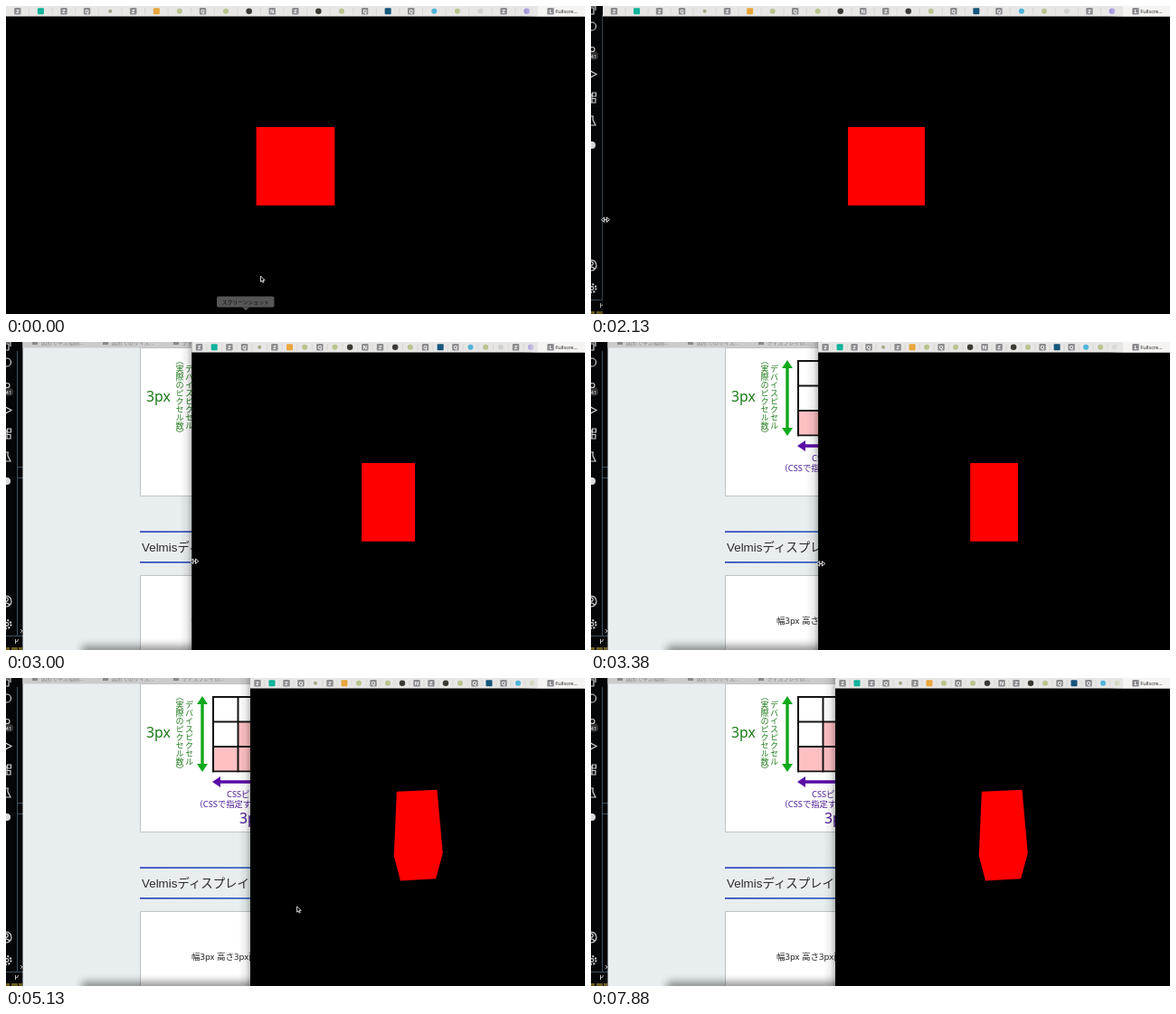
Animation, 640 px wide and 341 px high, one loop 8 s. Source, as an HTML page:

```html
<!DOCTYPE html>
<html lang="ja">
<head>
<meta charset="utf-8">
<title>Resize and orbit</title>
<style>
html, body { margin: 0; width: 100%; height: 100%; overflow: hidden; background: #000; }
svg { display: block; width: 100vw; height: 100vh; }
text { font-family: "Noto Sans", "Noto Sans CJK JP", "Noto Sans CJK", sans-serif; }
.mid { text-anchor: middle; }
.vert { writing-mode: vertical-rl; text-anchor: middle; font-size: 9.1px; }
.head { font: 13.4px "Liberation Sans", "Noto Sans CJK JP", "Noto Sans CJK", sans-serif; }
.icons { fill: none; stroke: #d4d4d4; stroke-width: 1.2; }
.dock { filter: blur(4px); opacity: .4; }
</style>
</head>
<body>
<svg viewBox="0 0 640 341">
  <defs>
    <linearGradient id="shade"><stop offset="0" stop-opacity="0"/><stop offset=".6" stop-opacity=".07"/><stop offset="1" stop-opacity=".24"/></linearGradient>
    <linearGradient id="fade"><stop offset="0" stop-color="#e7e6e5" stop-opacity="0"/><stop offset="1" stop-color="#e7e6e5"/></linearGradient>
    <linearGradient id="rule"><stop offset="0" stop-color="#3a50bd"/><stop offset="1" stop-color="#55b4d6"/></linearGradient>
    <pattern id="grid" x="228" y="20" width="27.500" height="27.500" patternUnits="userSpaceOnUse">
      <path d="M0 1H27.500M1 0V27.500" stroke="#111" stroke-width="2"/>
    </pattern>
  </defs>

  <!-- editor strip -->
  <rect width="640" height="341" fill="#050608"/>
  <path d="M12.500 10V326M12 138.500h7M12 150.500h7M0 325.500h19" stroke="#3b5360" fill="none"/>
  <g class="icons">
    <path d="M-4 2h7v7h-7M0 0h5v5"/>
    <circle cx="1" cy="22.500" r="4.500"/>
    <circle cx="1.500" cy="48" r="2.500"/>
    <path d="M-4 70L6 75.500L-4 81"/>
    <path d="M-4 98h5v9h-5M1 102.500h4v4.500h-4M1.500 96h4v4h-4z"/>
    <path d="M-2 122h5M2 122v4l3 6h-9"/>
    <circle cx="0" cy="287" r="6"/><circle cx="0" cy="285" r="2.200"/><path d="M-4 291q4-4 8 0"/>
    <circle cx="1" cy="312.500" r="4.500" stroke-width="2" stroke-dasharray="2 1.500"/><circle cx="1" cy="312.500" r="1.800"/>
    <path d="M16 318l2 2l-2 2M10.500 329v5M10.500 332q3 0 3-3" stroke-width=".9"/>
  </g>
  <circle cx="1" cy="154" r="4" fill="#ddd"/>
  <rect x="-3" y="51" width="11" height="8.500" rx="4" fill="#333"/>
  <text x="3" y="57.600" class="mid" font-size="6" fill="#fff">41</text>
  <path d="M0 339.500h19" stroke="#6c5d1c" stroke-width="3" stroke-dasharray="4 2 7 1"/>

  <!-- article window -->
  <rect x="18.500" width="622" height="341" fill="#e8eeef"/>
  <rect x="18.500" width="622" height="6.500" fill="#cbcbcb"/>
  <g id="pages" font-size="6" fill="#8a8a8a"></g>
  <path d="M640 6.500H148.500V170.500H640M640 258.500H148.500V345H640" fill="#fff" stroke="#bfc3c4"/>
  <g fill="#1d7a1a">
    <text x="155" y="66" font-size="15.800">3px</text>
    <text class="vert" x="202" y="61">デバイスピクセル</text>
    <text class="vert" x="191.500" y="61">（実際のピクセル数）</text>
  </g>
  <path d="M217 20l6 9h-4.300v66h4.300l-6 9l-6-9h4.300v-66h-4.300z" fill="#10a81c"/>
  <path d="M228 115l9-6v4.300h60v3.400h-60v4.300z" fill="#5a0da6"/>
  <path d="M256 48h56v55h-84v-27.500h28z" fill="#ffc0c4"/>
  <rect x="228" y="20" width="84.500" height="84.500" fill="url(#grid)"/>
  <g fill="#4c1a96">
    <text x="244" y="131.500" font-size="9.300">CSSピクセル</text>
    <text x="208.500" y="142.500" font-size="9.300">（CSSで指定するピクセル）</text>
    <text x="258" y="161" font-size="15.800">3px</text>
  </g>
  <rect x="148" y="209.200" width="492" height="1.800" fill="url(#rule)"/>
  <rect x="148" y="243" width="492" height="1.800" fill="url(#rule)"/>
  <text class="head" x="150" y="232" fill="#2b2b2b">Velmisディスプレイ</text>
  <text x="205" y="311.500" font-size="9.500" fill="#222">幅3px 高さ3px画像</text>
  <rect class="dock" x="84" y="336" width="560" height="20"/>

  <!-- front window -->
  <rect id="shadow" width="13" height="341" fill="url(#shade)"/>
  <rect id="stage" width="640" height="341"/>
  <path id="cube" fill="#f00"/>
  <rect id="bar" width="640" height="11.500" fill="#e7e6e5"/>
  <g id="tabs"></g>
  <rect x="572" width="16" height="11.500" fill="url(#fade)"/>
  <rect x="588" width="52" height="11.500" fill="#f5f4f3"/>
  <g id="active"></g>
  <text x="607.300" y="7.900" font-size="5.600" fill="#222">Fullscre…</text>

  <g id="tip">
    <rect x="233" y="321.500" width="63.500" height="12" rx="2" fill="#565656"/>
    <path d="M261 333.500h8l-4 3.500z" fill="#565656"/>
    <text x="264.800" y="329.800" class="mid" font-size="5.800" fill="#0c0c0c">スクリーンショット</text>
  </g>
  <path id="arrow" d="M0 0V6.300L1.500 5L2.500 7.300L3.600 6.800L2.600 4.600H4.600Z" stroke="#fff" stroke-width=".8"/>
  <path id="sizer" d="M-4.500 0L-1.300-2.700V2.700ZM4.500 0L1.300-2.700V2.700ZM-1.300 0H1.300" stroke="#fff" stroke-width=".9"/>
</svg>
<script>
const LOOP = 8000, STEP = 125, EDGE = 588.5, VIEW = 333;
const $ = id => document.getElementById(id);
const set = (el, attrs) => { for (const k in attrs) el.setAttribute(k, attrs[k]); return el; };
const add = (parent, tag, attrs) =>
  parent.appendChild(set(document.createElementNS(parent.namespaceURI, tag), attrs));
const show = (el, on) => { el.style.display = on ? "" : "none"; };

["図形で学ぶ描画…", "図形でのサイズ…", "ディスプレイの…"].forEach((title, i) => {
  const x = 29 + 78 * i;
  add($("pages"), "rect", { x, width: 6, height: 3 });
  add($("pages"), "text", { x: x + 10, y: 2.6 }).textContent = title;
});

// Lower-case codes are plain site icons, capitals are letter tiles.
const ICONS = {
  t: ["rect", "#10b39a", 7], h: ["circle", "#a5a584", 4], o: ["rect", "#e9a63c", 7],
  s: ["circle", "#b9c48c", 6], d: ["circle", "#3b3a34", 6.5], n: ["rect", "#17567c", 7],
  w: ["circle", "#4fb3dc", 6], c: ["circle", "#d2d2d2", 6], p: ["circle", "#9a86de", 6.5]
};
function icon(parent, code) {
  const g = add(parent, "g", {});
  const [tag, fill, d] = ICONS[code] || ["rect", "#8c8c8f", 7.4];
  if (tag === "circle") add(g, tag, { r: d / 2, fill });
  else add(g, tag, { x: -d / 2, y: -d / 2, width: d, height: d, rx: 1, fill });
  if (!ICONS[code]) {
    add(g, "text", { y: 2, class: "mid", "font-size": 5.6, "font-weight": 700, fill: "#fff" }).textContent = code;
  }
  return g;
}
const tabs = [..."ZtZQhZosQsdNZdsQnQwscZp"].map(code => {
  const g = icon($("tabs"), code);
  return { g, line: add($("tabs"), "path", { d: "M0 2V9.500", stroke: "#d3d2d1", "stroke-width": .7 }) };
});
set(icon($("active"), "L"), { transform: "translate(602 5.700)" });

// The window edge speeds up, then settles at 270.
const leftEdge = t => 270 * (1 - Math.exp(-((Math.max(0, t - 1900) / 930) ** 2.12)));

// Pointer stops: time, x, y.
const GRAB = [4000, 413.8, 199.7], RELEASE = [5000, 332.3, 256.1];
const STOPS = [[0, 281.5, 299], [875, 5, 234], [1750, 3, 234], [3750, 270, 248], GRAB, [4375, 386.5, 233],
  RELEASE, [5750, 268, 236.5], [6250, 268, 237], [7000, 312, 334], [7625, 545, 338]];
const isSizing = t => t >= 1000 && t < 3750;

function pointer(t) {
  const i = STOPS.findIndex(s => s[0] > t);
  if (i < 0) return STOPS[STOPS.length - 1].slice(1);
  const [t0, x0, y0] = STOPS[i - 1], [t1, x1, y1] = STOPS[i];
  const f = (t - t0) / (t1 - t0);
  return [isSizing(t) ? leftEdge(t) + 3 : x0 + (x1 - x0) * f, y0 + (y1 - y0) * f];
}

// Dragging by the view height turns the camera once around.
function orbit(t) {
  const [x, y] = pointer(Math.min(Math.max(t, GRAB[0]), RELEASE[0]));
  const turn = 2 * Math.PI / VIEW;
  return [(GRAB[1] - x) * turn, (y - GRAB[2]) * turn];
}

// Perspective unit cube; the canvas squeezes with the window width.
function cubePath(left, yaw, pitch) {
  const focal = VIEW / 2 / Math.tan(37.5 * Math.PI / 180), dist = 3;
  const sa = Math.sin(yaw), ca = Math.cos(yaw), se = Math.sin(pitch), ce = Math.cos(pitch);
  const squeeze = (640 - left) / 640, cx = (640 + left) / 2, cy = 177.3;
  const project = ([x, y, z]) => {
    const depth = x * sa + z * ca;
    const k = focal / (dist - y * se - depth * ce);
    return [cx + (x * ca - z * sa) * k * squeeze, cy - (y * ce - depth * se) * k];
  };
  let d = "";
  for (let axis = 0; axis < 3; axis++) for (const s of [.5, -.5]) {
    const pts = [[-1, -.5], [1, -.5], [1, .5], [-1, .5]].map(([u, v]) => {
      const p = [];
      p[axis] = s;
      p[(axis + 1) % 3] = u * s;
      p[(axis + 2) % 3] = v;
      return project(p);
    });
    const area = pts.reduce((sum, p, i) => {
      const q = pts[(i + 1) % 4];
      return sum + p[0] * q[1] - q[0] * p[1];
    }, 0);
    if (area < 0) d += "M" + pts.map(p => p.map(n => n.toFixed(2)).join(" ")).join("L") + "Z";
  }
  return d;
}

function draw(t) {
  const left = leftEdge(t);
  set($("stage"), { x: left });
  set($("bar"), { x: left });
  set($("shadow"), { x: left - 13 });
  const gap = Math.max(16, (EDGE - left) / tabs.length);
  tabs.forEach(({ g, line }, i) => {
    const x = left + gap * (i + .5);
    set(g, { transform: `translate(${x} 5.700)` });
    set(line, { transform: `translate(${x + gap / 2} 0)` });
    show(g, x < 592);
    show(line, x + gap / 2 < 590);
  });
  set($("cube"), { d: cubePath(left, ...orbit(t)) });

  const move = { transform: `translate(${pointer(t).join(" ")})` };
  set($("arrow"), move);
  set($("sizer"), move);
  show($("sizer"), isSizing(t));
  show($("arrow"), !isSizing(t) && t < 7625);
  show($("tip"), t < 250);
}

function tick(now) {
  draw(Math.floor(now % LOOP / STEP) * STEP);
  requestAnimationFrame(tick);
}
draw(0);
requestAnimationFrame(tick);
</script>
</body>
</html>
```
